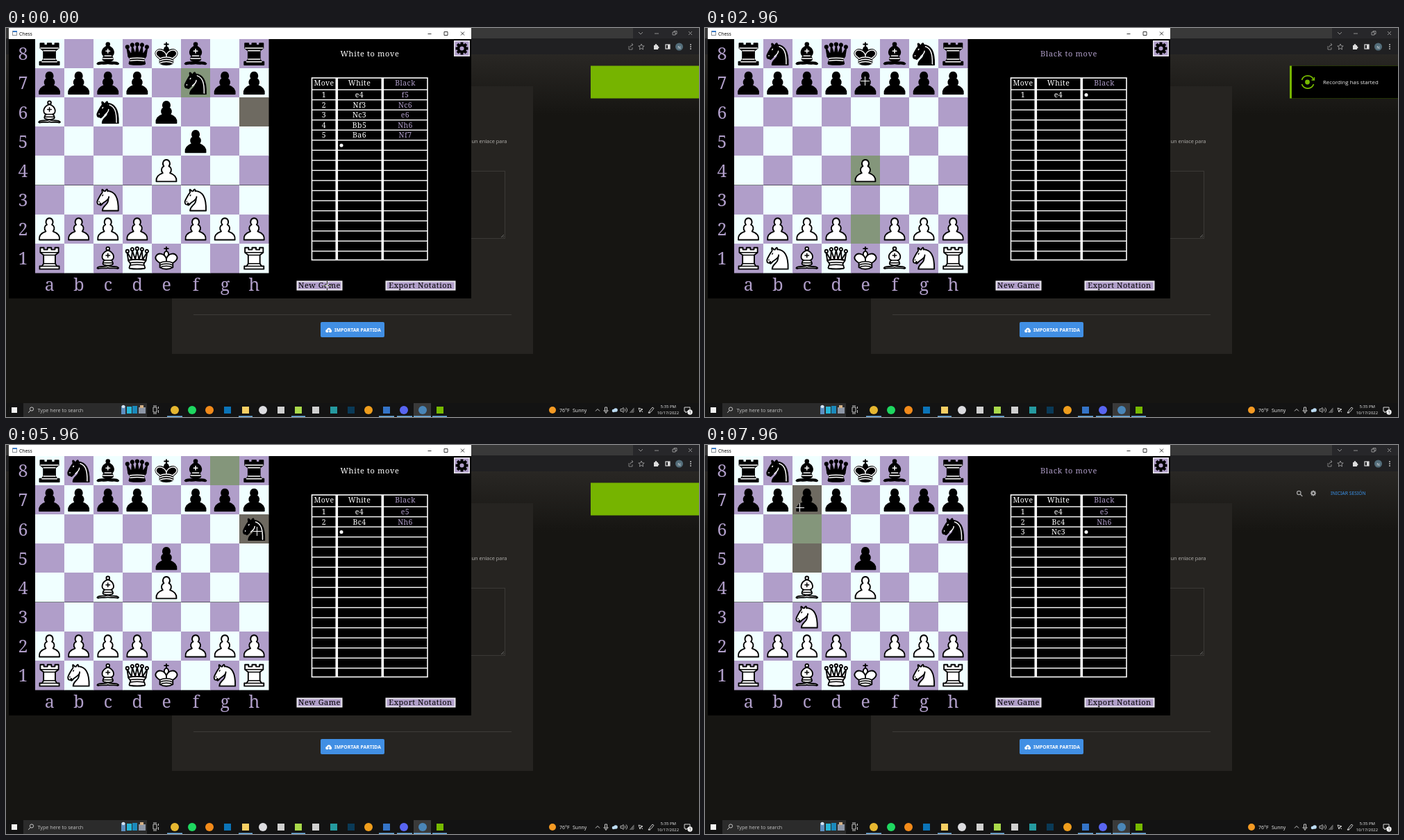
Recreate the animation shown at these times as an HTML page with a canvas. Size 998 by 561 pixels, loop 8000 ms.

```html
<!DOCTYPE html>
<html lang="en">
<head>
<meta charset="utf-8">
<title>Chess</title>
<style>
  html, body { margin: 0; width: 100%; height: 100%; overflow: hidden; background: #161512; }
  canvas { display: block; }
</style>
</head>
<body>
<canvas id="stage" width="998" height="561"></canvas>
<script>
const LOOP = 8000, W = 998, H = 561;
const CELL = 42.1, BOARD_X = 41.5, BOARD_Y = 16;
const LIGHT = '#f0ffff', PURPLE = '#b09ec9', SERIF = '"Noto Serif", serif', SANS = '"Open Sans", sans-serif';
const stage = document.getElementById('stage').getContext('2d');
let ctx = stage;

// ---------- drawing helpers ----------
function box(x, y, w, h, color) {
  ctx.fillStyle = color;
  ctx.fillRect(x, y, w, h);
}
function frame(x, y, w, h, color, width = 1) {
  ctx.strokeStyle = color;
  ctx.lineWidth = width;
  ctx.strokeRect(x, y, w, h);
}
function disc(x, y, r, color) {
  ctx.fillStyle = color;
  ctx.beginPath();
  ctx.arc(x, y, r, 0, 7);
  ctx.fill();
}
function line(path, color, width = 1, x = 0, y = 0) {
  ctx.save();
  ctx.translate(x, y);
  ctx.strokeStyle = color;
  ctx.lineWidth = width;
  ctx.stroke(new Path2D(path));
  ctx.restore();
}
function text(str, x, y, font, color, align = 'left', spacing = 0) {
  ctx.font = font;
  ctx.letterSpacing = spacing + 'px';
  ctx.textAlign = align;
  ctx.fillStyle = color;
  ctx.fillText(str, x, y);
}
const slab = (str, x, y, color, size = 10.5, spacing = 0.4) =>
  text(str, x, y, `${size}px ${SERIF}`, color, 'center', spacing);

function gear(x, y, r, color, hole) {
  ctx.fillStyle = color;
  for (let i = 0; i < 8; i++) {
    ctx.save();
    ctx.translate(x, y);
    ctx.rotate(i * Math.PI / 4);
    ctx.fillRect(-r * 0.22, -r, r * 0.44, r);
    ctx.restore();
  }
  disc(x, y, r * 0.76, color);
  disc(x, y, r * 0.34, hole);
}

// ---------- pieces on a 45-unit cell: outlines, details, details on black only ----------
const ball = (x, y, r) => `M${x - r} ${y}a${r} ${r} 0 1 1 ${2 * r} 0a${r} ${r} 0 1 1 ${-2 * r} 0z`;
const SHAPES = {
  p: [['M7 39.5C6 32 11 28.5 17 26.5C13.5 22.5 15 17.5 18.7 16C15.5 12.5 17.5 6 22.5 6S29.5 12.5 26.3 16C30 17.5 31.5 22.5 28 26.5C34 28.5 39 32 38 39.5Z']],
  r: [['M7.5 39.5V35H11L13.5 31V18L8.5 14V6.5H14V9.5H19.5V6.5H25.5V9.5H31V6.5H36.5V14L31.5 18V31L34 35H37.5V39.5Z'],
      'M9 14H36M13.5 18H31.5M13.5 31H31.5M11 35H34'],
  n: [['M22 9C33 10 39 18 38.5 39.5H14C14 30 25 32 23 18',
       'M24 18C24.4 21 18.5 25.4 16 27C13 29 13.2 31.3 11 31C10 30 12.4 28 11 28C10 28 11.2 29.2 10 30C9 30 6 31 6 26C6 24 12 14 12 14S13.9 12.1 14 10.5C13.3 9.5 13.5 8.5 13.5 7C14.5 6 16.5 9.5 16.5 9.5H18.5S19.3 7.5 21 6.5C22 6.5 22 9.5 22 9.5'],
      'M9 25.3v.5M14.8 15.3l-.7 1.2',
      'M25 11.5C32.5 14 36 21 35.6 38.5M23.5 18.5C23.5 22 20 25 17.5 27'],
  b: [['M9 36c3.4-1 10.1.4 13.5-2 3.4 2.4 10.1 1 13.5 2 0 0 1.6.5 3 2-.7 1-1.6 1-3 .5-3.4-1-10.1.5-13.5-1-3.4 1.5-10.1 0-13.5 1-1.4.5-2.3.5-3-.5 1.4-1.9 3-2 3-2z',
       'M15 32c2.5 2.5 12.5 2.5 15 0 .5-1.5 0-2 0-2 0-2.5-2.5-4-2.5-4 5.5-1.5 6-11.5-5-15.5-11 4-10.5 14-5 15.5 0 0-2.5 1.5-2.5 4 0 0-.5.5 0 2z',
       ball(22.5, 8, 2.5)],
      'M17.5 26h10M15 30h15M22.5 15.5v6M19.5 18.5h6'],
  q: [['M9 26c8.5-1.5 21-1.5 27 0l2-12.5L31 25l-1-14-4.7 13.5-2.8-14.5-2.8 14.5L15 11l-1 14-7-11.5z',
       'M9 26c0 2 1.5 2 2.5 4 1 1.5 1 1 .5 3.5-1.5 1-1 2.5-1 2.5-1.5 1.5 0 2.5 0 2.5 6.5 1 16.5 1 23 0 0 0 1.5-1 0-2.5 0 0 .5-1.5-1-2.5-.5-2-.5-2 .5-3.5 1-2 2.5-2 2.5-4-8.5-1.5-18.5-1.5-27 0z',
       ...[[7.5, 12], [15, 9], [22.5, 8], [30, 9], [37.5, 12]].map(([x, y]) => ball(x, y, 2.3))],
      'M11.5 30c3.5-1 18.5-1 22 0M12 33.5c6-1 15-1 21 0'],
  k: [['M22.5 12V5.5M19.5 8h6',
       'M22.5 25s4.5-7.5 3-10.5c0 0-1-2.5-3-2.5s-3 2.5-3 2.5c-1.5 3 3 10.5 3 10.5z',
       'M12.5 37c5.5 3.5 14.5 3.5 20 0v-7s9-4.5 6-10.5c-4-6.5-13.5-3.5-16 4v3.5-3.5c-2.5-7.5-12-10.5-16-4-3 6 6 10.5 6 10.5z'],
      'M12.5 30c5.5-3 14.5-3 20 0M12.5 33.5c5.5-3 14.5-3 20 0M12.5 37c5.5-3 14.5-3 20 0',
      'M32 29.5s8.5-4 6-9.6c-4-6-13-2-15.5 4.6v2.1-2.1c-2.5-6.6-11.5-10.6-15.5-4.6-2.5 5.6 6 9.6 6 9.6']
};
function drawPiece(code, x, y) {
  const kind = code.toLowerCase(), isBlack = code === kind;
  const [outlines, details = '', blackDetails = ''] = SHAPES[kind];
  ctx.save();
  ctx.translate(x, y);
  ctx.scale(CELL / 45, CELL / 45);
  ctx.lineJoin = ctx.lineCap = 'round';
  for (const d of outlines) {
    ctx.fillStyle = isBlack ? '#000' : '#fff';
    ctx.fill(new Path2D(d));
    line(d, '#000', 2);
  }
  line(details + (isBlack ? blackDetails : ''), isBlack ? '#fff' : '#000', 1.6);
  ctx.restore();
}

// ---------- the game ----------
const parseBoard = rows => [...rows.replace(/\d/g, n => '.'.repeat(n)).replace(/\//g, '')];
const squareIndex = name => (8 - name[1]) * 8 + 'abcdefgh'.indexOf(name[0]);
const STEPS = [
  { at: 0, board: 'r1bqkb1r/pppp1npp/B1n1p3/5p2/4P3/2N2N2/PPPP1PPP/R1BQK2R', marks: 'f7 h6',
    moves: 'e4 f5 Nf3 Nc6 Nc3 e6 Bb5 Nh6 Ba6 Nf7'.split(' ') },
  { at: 300, board: 'rnbqkbnr/pppppppp/8/8/8/8/PPPPPPPP/RNBQKBNR', marks: '', moves: [] },
  { at: 1220, marks: 'e2 e3 e4' },
  { at: 1920, marks: 'e2 e4', note: 'e4' },
  { at: 3060, marks: 'e7 e6 e5' },
  { at: 3380, marks: 'e7 e5', note: 'e5' },
  { at: 3980, marks: 'f1 e2 d3 c4 b5 a6' },
  { at: 4980, marks: 'f1 c4', note: 'Bc4' },
  { at: 5460, marks: 'g8 e7 f6 h6' },
  { at: 5860, marks: 'g8 h6', note: 'Nh6' },
  { at: 6940, marks: 'b1 a3 c3' },
  { at: 7360, marks: 'b1 c3', note: 'Nc3' },
  { at: 7780, marks: 'c7 c6 c5' }
];
function gameAt(t) {
  let board, moves, marks;
  for (const step of STEPS) {
    if (step.at > t) break;
    marks = step.marks.split(' ').filter(Boolean).map(squareIndex);
    if (step.board) {
      board = parseBoard(step.board);
      moves = [...step.moves];
    }
    if (step.note) {
      const [from, to] = marks;
      board[to] = board[from];
      board[from] = '.';
      moves.push(step.note);
    }
  }
  return { board, moves, marks };
}

// ---------- motion ----------
const smooth = (t, from, to) => {
  const p = Math.min(1, Math.max(0, (t - from) / (to - from)));
  return p * p * (3 - 2 * p);
};
const CURSOR = [
  [0, 462, 371], [380, 462, 371], [1120, 232, 293], [1260, 232, 293], [1630, 236, 200], [1940, 234, 204],
  [2150, 200, 170], [2700, 230, 78], [2960, 230, 76], [3080, 230, 76], [3350, 231, 164], [3460, 231, 166],
  [3900, 273, 330], [4060, 273, 330], [4700, 155, 212], [4880, 152, 214], [5030, 150, 212],
  [5400, 315, 40], [5500, 315, 40], [5820, 361, 123], [5960, 361, 124], [6120, 361, 124],
  [6830, 140, 312], [6920, 106, 330], [6980, 106, 330], [7210, 147, 249], [7390, 147, 248],
  [7700, 137, 92], [7800, 136, 90], [8000, 136, 90]
];
function cursorAt(t) {
  const i = CURSOR.findIndex(k => k[0] > t);
  const [t0, x0, y0] = CURSOR[i - 1], [t1, x1, y1] = CURSOR[i];
  const p = smooth(t, t0, t1);
  return [x0 + (x1 - x0) * p, y0 + (y1 - y0) * p];
}

// ---------- static scenery ----------
function drawBrowser() {
  box(0, 0, W, H, '#161512');
  const sky = ctx.createLinearGradient(0, 38, 0, 125);
  sky.addColorStop(0, '#292724');
  sky.addColorStop(1, '#161512');
  box(0, 38, W, 90, sky);
  box(0, 0, W, 15, '#393939');
  box(903, 0, 95, 15, '#27272a');
  box(0, 15, W, 23, '#202022');
  line('M911 6l3 3 3-3M934 8h6M960 6h4v4h-4zM962 6v-1.5h4v4h-2M983 5l5 5M988 5l-5 5', '#aaa', 0.8);
  line('M897 26v5h5v-3M899 28c0-3 2-4 4-4m-2-2 2 2-2 2', '#999', 0.8);
  line('M915 23l1.2 2.8 3 .2-2.3 2 .7 3-2.6-1.6-2.6 1.6.7-3-2.3-2 3-.2z', '#bbb', 0.7);
  box(933, 25, 6, 6, '#ddd');
  disc(936, 24.5, 1.5, '#ddd');
  disc(939, 28, 1.5, '#ddd');
  frame(950, 24, 6, 6, '#ddd', 1.2);
  box(953, 24, 3, 6, '#ddd');
  disc(969.5, 27, 5.5, '#536d7a');
  text('N', 969.5, 29.5, `6px ${SANS}`, '#eee', 'center');
  [24, 27, 30].forEach(y => disc(986, y, 0.9, '#ccc'));

  box(239, 84, 520, 386, '#262421');
  text('un enlace para', 670.5, 166, `7.4px ${SANS}`, '#b5b3b0');
  box(500, 206, 218, 97, '#23211e');
  frame(500.5, 206.5, 218, 97, '#3b3936');
  line('M713 302l4-4M715.5 302l1.5-1.5', '#888', 0.7);
  box(270, 413, 458, 1, '#3d3b38');
  ctx.fillStyle = '#418fe4';
  ctx.beginPath();
  ctx.roundRect(453, 424, 92, 22, 2);
  ctx.fill();
  disc(462.5, 437, 2.3, '#fff');
  disc(465, 435.5, 2.9, '#fff');
  disc(467, 437, 2.2, '#fff');
  line('M464.7 439v-4m-1.5 1.5 1.5-1.5 1.5 1.5', '#418fe4', 0.9);
  text('IMPORTAR PARTIDA', 473, 437.7, `600 6.8px "Noto Sans", sans-serif`, '#fff');

  line(ball(855.3, 69, 2.7) + 'M857.3 71l3 3', '#aaa', 1.2);
  gear(876, 69.5, 4, '#aaa', '#1d1c19');
  text('INICIAR SESIÓN', 901, 71.6, `6.8px "Noto Sans", sans-serif`, '#3a92ea');
}

function drawTaskbar() {
  box(0, 541, W, 20, '#131313');
  box(8, 547, 8, 8, '#f2f2f2');
  box(25, 541, 178, 20, '#2b2b2b');
  line(ball(37, 549.5, 2.6) + 'M35.2 551.5l-3 3.3', '#ddd', 0.9);
  text('Type here to search', 45.5, 553.5, `7.2px ${SANS}`, '#c4c4c4');
  box(166, 545, 6, 12, '#5e8fc0');
  disc(169, 546, 2.3, '#d5e2ee');
  box(174, 546, 7, 10, '#28b7d8');
  box(182, 545, 7, 11, '#1b89bb');
  box(191, 547, 10, 9, '#8d96a6');
  box(193, 544, 5, 4, '#d3b086');
  line('M212 547h5v7h-5zM219.5 546v3M219.5 551v4M212 545h5M212 556h5', '#ddd', 0.9);
  box(587, 541, 25, 20, '#3a3a3a');
  const icons = [
    [243, '#e6b730', 1], [268, '#1ed760', 1], [293, '#f28a1a', 1], [319, '#0b74b8'], [345, '#f7cf63'],
    [370, '#dcdce0', 1], [396, '#d0d0d0'], [421, '#a9d94a'], [446, '#d0d0d0'], [472, '#259aa0'],
    [497, '#0a3a57'], [522, '#ef9d1c', 1], [548, '#3474c8'], [573, '#5865f2', 1], [600, '#4a86b8', 1], [625, '#76b900']
  ];
  for (const [x, color, round] of icons)
    round ? disc(x, 551, 6, color) : box(x - 5, 546, 10, 10, color);
  [[232, 22], [335, 20], [411, 20], [537, 22], [563, 22], [587, 25], [614, 21]]
    .forEach(([x, w]) => box(x, 559.5, w, 1.5, '#76b9ed'));

  disc(787, 551, 5, '#f59a23');
  text('76°F', 797, 553.5, `7px ${SANS}`, '#eee');
  text('Sunny', 816, 553.5, `7px ${SANS}`, '#eee');
  line('M849 552.5l3-3 3 3M862.5 547h3v5h-3zM861 551c0 4 6 4 6 0M864 554v2', '#ddd', 0.9);
  disc(875, 552, 2.3, '#bcdcf5');
  disc(878, 551, 2.8, '#bcdcf5');
  line('M885 549.5h2l2-2v7l-2-2h-2zM891 549c1 1 1 3 0 4M893 547.5c2 2 2 5 0 7', '#ddd', 0.8);
  line('M898.5 555l6-7M900.5 555l4-5M902.5 555l2-2.5', '#999', 1);
  line('M911 548l6 2-3 1-1 3zM914 551l3 3', '#ddd', 0.9);
  line('M925 555l2-3 4-5 2 1.5-4 5zM925 555h3', '#ddd', 0.9);
  text('5:35 PM', 965, 548, `6px ${SANS}`, '#eee', 'right');
  text('10/17/2022', 969, 557.3, `5.9px ${SANS}`, '#eee', 'right');
  line('M977 547h8v6h-4l-2 2v-2h-2z', '#eee', 0.9);
  disc(985, 554, 3.7, '#eee');
  text('1', 985, 556, `5.5px ${SANS}`, '#111', 'center');
}

function button(label, x, w) {
  box(x, 364.5, w, 14, '#e9e6ee');
  box(x + 2, 366.5, w - 4, 10, PURPLE);
  slab(label, x + w / 2, 375.3, '#000', 11, 0.5);
}

function drawWindow() {
  box(4, 0, 666, 390, '#000');
  box(4, 0, 666, 16, '#fff');
  frame(9.5, 4.5, 6, 6, '#8a8f96');
  box(10, 4, 6, 2, '#3a7bc8');
  text('Chess', 19, 10.6, `6.8px ${SANS}`, '#000');
  line('M607.5 8.5h5M631 5.5h5v5h-5zM655 5.5l5 5M660 5.5l-5 5', '#222', 0.9);

  for (let i = 0; i < 8; i++) {
    text(8 - i, 24.5, 46.3 + i * CELL, `25px ${SERIF}`, PURPLE, 'center');
    text('abcdefgh'[i], 62.8 + i * CELL, 379, `25px ${SERIF}`, PURPLE, 'center');
  }

  box(645, 18, 23, 23, '#e9e6ee');
  box(646.5, 19.5, 20, 20, PURPLE);
  gear(656.5, 29.5, 9, '#000', PURPLE);

  frame(440.5, 72, 166.5, 262.5, '#fff', 1.6);
  for (let i = 0; i < 17; i++) box(440, 88.3 + i * 14.55, 167, 1.4, '#fff');
  box(474.5, 72, 3.6, 262, '#fff');
  box(540.5, 72, 3.6, 262, '#fff');
  slab('Move', 458, 83, '#fff');
  slab('White', 509, 83, '#fff');
  slab('Black', 575, 83, PURPLE);
  button('New Game', 418.5, 66);
  button('Export Notation', 546.5, 101);
}

// ---------- moving parts ----------
function drawGame({ board, moves, marks }) {
  const whiteTurn = moves.length % 2 === 0;
  slab(whiteTurn ? 'White to move' : 'Black to move', 524, 40.5, whiteTurn ? '#fff' : PURPLE, 11, 0.65);

  board.forEach((piece, i) => {
    const col = i % 8, row = i >> 3, light = (col + row) % 2 === 0;
    const x = BOARD_X + col * CELL, y = BOARD_Y + row * CELL;
    const color = marks.includes(i) ? (light ? '#84967b' : '#6e6a61') : (light ? LIGHT : PURPLE);
    box(Math.round(x), Math.round(y), 42.5, 42.5, color);
  });
  board.forEach((piece, i) => {
    if (piece !== '.') drawPiece(piece, BOARD_X + i % 8 * CELL, BOARD_Y + (i >> 3) * CELL);
  });

  const rowY = n => 96.2 + (n >> 1) * 14.55;
  moves.forEach((move, n) => {
    if (n % 2 === 0) slab(n / 2 + 1, 458, rowY(n) + 4, '#fff');
    slab(move, n % 2 ? 575 : 509, rowY(n) + 4, n % 2 ? PURPLE : '#fff');
  });
  if (moves.length) disc(whiteTurn ? 483 : 549, rowY(moves.length) + 0.2, 2.5, '#fff');
}

function drawNotice(t) {
  const left = 842 + 157 * smooth(t, 6080, 6420);
  const panel = 845 + 154 * (1 - smooth(t, 80, 440) + smooth(t, 5600, 5930));
  box(left, 54.5, W - left, 47, '#76b400');
  if (panel >= W) return;
  box(panel, 54.5, W - panel, 47, '#000');
  ctx.save();
  ctx.translate(panel - 845, 0);
  line('M859.5 75a9 9 0 0 1 17 0M876.5 81a9 9 0 0 1-17 0', '#76b900', 1.8);
  line('M873.5 75h4v-4', '#76b900', 1.4);
  disc(867.5, 78, 3.4, '#76b900');
  text('Recording has started', 890, 81, `7.85px ${SANS}`, '#eee');
  ctx.restore();
}

function drawCursor([x, y]) {
  ctx.save();
  ctx.globalCompositeOperation = 'difference';
  x = Math.round(x);
  y = Math.round(y);
  box(x - 6, y, 13, 1, '#fff');
  box(x, y - 6, 1, 6, '#fff');
  box(x, y + 1, 1, 6, '#fff');
  ctx.restore();
}

const scenery = Object.assign(document.createElement('canvas'), { width: W, height: H });
ctx = scenery.getContext('2d');
drawBrowser();
drawTaskbar();
drawWindow();
ctx = stage;

function render(now) {
  const t = now % LOOP;
  ctx.drawImage(scenery, 0, 0);
  drawGame(gameAt(t));
  drawNotice(t);
  drawCursor(cursorAt(t));
}
const start = performance.now();
render(0);
requestAnimationFrame(function tick(now) {
  render(Math.max(0, now - start));
  requestAnimationFrame(tick);
});
</script>
</body>
</html>
```
